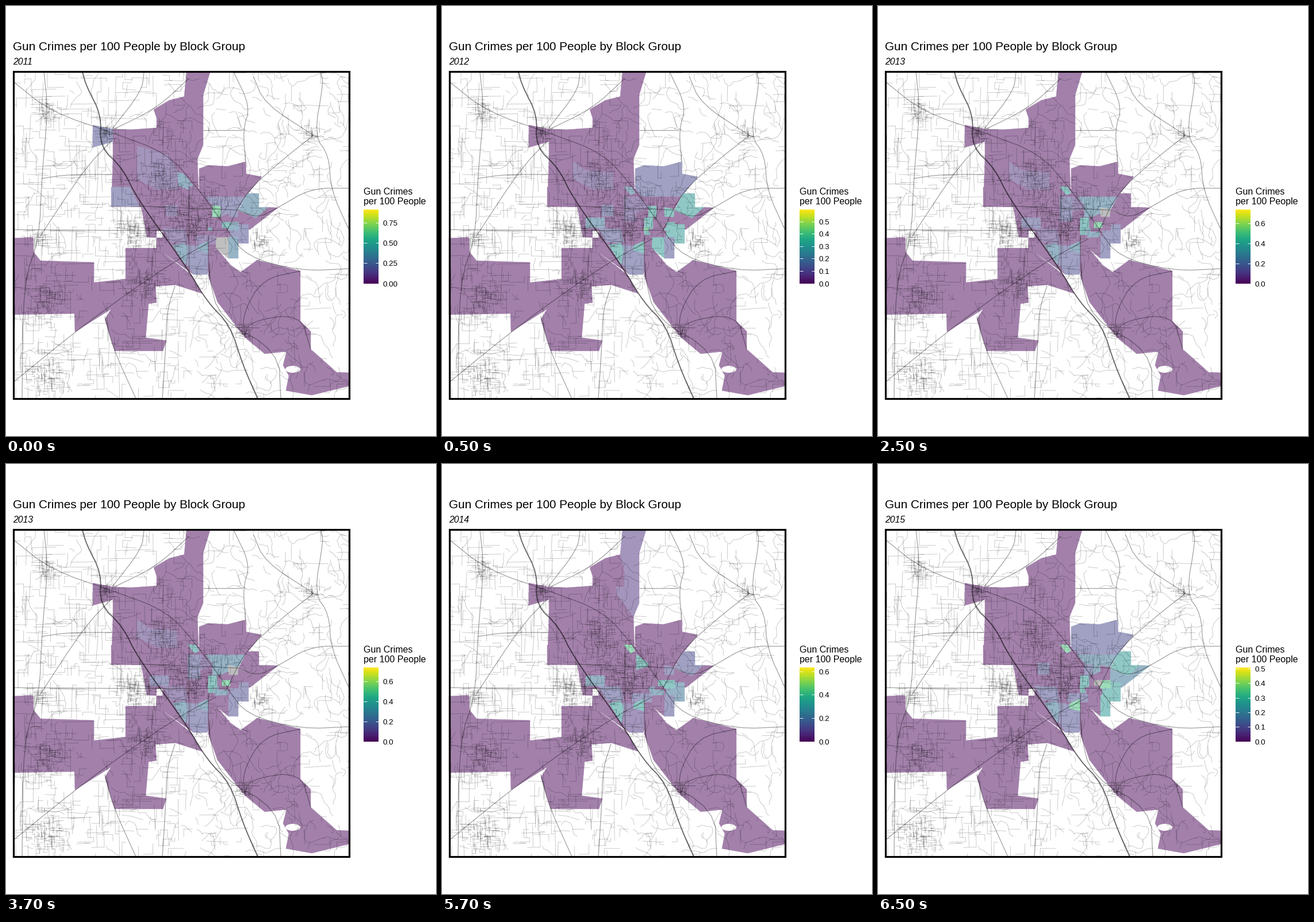
Write a matplotlib script that moves like this. It is 748x748 px and loops after 8 s.

```python
import numpy as np
import matplotlib.pyplot as plt
from matplotlib.animation import FuncAnimation
from matplotlib.collections import LineCollection
from matplotlib.patches import Ellipse, Polygon, Rectangle

SIZE, DPI = 748, 100
PT = 72 / DPI  # points per pixel
# top of the scale, tick step, decimals
SCALES = [(.911, .25, 2), (.595, .1, 1), (.739, .2, 1), (.634, .2, 1), (.508, .1, 1)]
# steps on the scale
ZERO, FEW, LOW, MID, TEAL, HIGH, TOP, NA = 0, .12, .2, .34, .5, .68, 1, None
rng = np.random.default_rng(7)
viridis = plt.get_cmap("viridis")

plt.rcParams["font.family"] = "Liberation Sans"
fig = plt.figure(figsize=(SIZE / DPI, SIZE / DPI), dpi=DPI, facecolor="white")
ax = fig.add_axes([0, 0, 1, 1])
ax.axis("off")
frame = Rectangle((13.5, 113.5), 584, 569, fill=False, ec="black", lw=3.2 * PT, zorder=5)
ax.add_patch(frame)
areas = []


def tint(t):
    base = np.array([.5, .5, .5]) if t is NA else np.array(viridis(t)[:3])
    return tuple((base + 1) / 2)


def area(levels, *xy):
    """Block group with one level per year; four numbers give a rectangle."""
    if len(xy) == 4:
        x0, y0, x1, y1 = xy
        xy = (x0, y0, x1, y0, x1, y1, x0, y1)
    patch = Polygon(np.reshape(xy, (-1, 2)), lw=.3)
    ax.add_patch(patch)
    areas.append((patch, levels))


PLAIN = (ZERO,) * 5

# outer districts
area(PLAIN, 186, 214, 218, 215, 262, 212, 262, 195, 257, 180, 284, 164, 312, 157, 333, 266,
     336, 350, 183, 349, 186, 266)
area((ZERO, ZERO, ZERO, FEW, ZERO), 314, 115, 355, 115, 343, 155, 343, 242, 333, 266, 304, 226,
     303, 213, 317, 213, 318, 185, 310, 157)
area((LOW, ZERO, ZERO, ZERO, ZERO), 151, 207, 186, 214, 186, 236, 151, 246)
area((LOW, ZERO, ZERO, ZERO, ZERO), 183, 315, 216, 315, 232, 349, 183, 349)
area(PLAIN, 12, 404, 47, 402, 48, 428, 60, 443, 153, 446, 153, 481, 208, 475, 208, 421, 262, 421,
     322, 467, 341, 500, 294, 485, 260, 488, 262, 516, 248, 518, 243, 577, 279, 582, 273, 600,
     189, 600, 172, 545, 183, 527, 120, 567, 119, 535, 12, 537)
area(PLAIN, 352, 432, 367, 422, 390, 450, 408, 463, 437, 442, 512, 461, 512, 548, 530, 566,
     530, 597, 575, 637, 597, 638, 597, 661, 532, 677, 487, 669, 492, 643, 482, 625, 488, 601,
     450, 605, 415, 576, 368, 515, 352, 470)
ax.add_patch(Ellipse((499, 632), 26, 12, fc="white"))

# city base
area(PLAIN, 235, 348, 336, 318, 404, 352, 404, 404, 367, 424, 350, 467, 326, 467, 262, 421,
     262, 403, 245, 402)
ax.add_patch(Rectangle((262, 391), 10, 12, fc="white"))

# north east
area((ZERO, LOW, ZERO, ZERO, LOW), 336, 283, 352, 277, 385, 279, 417, 271, 418, 292, 445, 297,
     416, 332, 348, 332, 336, 318)
area((MID, TEAL, ZERO, LOW, TEAL), 416, 332, 421, 326, 440, 326, 440, 350, 456, 350, 435, 369,
     405, 355)
area((ZERO, ZERO, ZERO, ZERO, MID), 456, 350, 473, 351, 424, 389, 404, 380, 404, 356, 435, 369)
area((LOW, ZERO, MID, ZERO, MID), 347, 332, 416, 332, 404, 354, 374, 366)

# north of the centre
area((FEW, FEW, FEW, ZERO, ZERO), 228, 270, 250, 285, 298, 290, 298, 319, 262, 319, 228, 301)
area((FEW, ZERO, ZERO, ZERO, ZERO), 228, 243, 281, 259, 300, 290, 250, 285, 228, 270)
area((MID, ZERO, ZERO, ZERO, ZERO), 298, 289, 309, 292, 336, 326, 300, 313)
area((ZERO, MID, TEAL, HIGH, HIGH), 316, 314, 330, 315, 336, 325, 328, 329)
area((ZERO, FEW, LOW, ZERO, ZERO), 316, 332, 338, 374)
area((FEW, LOW, ZERO, ZERO, LOW), 278, 346, 298, 366)
area((ZERO, FEW, FEW, TEAL, ZERO), 338, 331, 363, 350, 338, 358)
area((HIGH, TEAL, MID, ZERO, LOW), 359, 348, 373, 367)
area((LOW, TEAL, NA, LOW, ZERO), 387, 350, 404, 354, 403, 367, 387, 366)
area((ZERO, MID, LOW, MID, ZERO), 250, 368, 283, 386)
area((FEW, LOW, FEW, LOW, LOW), 272, 386, 311, 388, 316, 412, 286, 411)

# centre
area((ZERO, TEAL, TEAL, ZERO, TEAL), 352, 368, 367, 398)
area((MID, HIGH, TEAL, TOP, TEAL), 351, 385, 359, 391)
area((FEW, ZERO, ZERO, LOW, LOW), 330, 399, 366, 414)
area((LOW, TEAL, LOW, MID, TEAL), 390, 380, 422, 413)
area((MID, TEAL, ZERO, TEAL, HIGH), 386, 376, 405, 390)
area((TEAL, TOP, HIGH, TEAL, NA), 376, 376, 390, 386)
area((TOP, TOP, MID, MID, ZERO), 359, 390, 370, 386, 370, 393, 386, 393, 386, 403, 366, 405)
area((NA, TEAL, TOP, TOP, TOP), 366, 403, 387, 402, 387, 439, 365, 421)
area((MID, LOW, LOW, LOW, TEAL), 387, 402, 404, 439)

# south of the centre
area((LOW, LOW, LOW, FEW, LOW), 312, 415, 352, 420, 350, 467, 326, 467, 306, 436)
area((MID, TEAL, MID, TEAL, MID), 290, 416, 310, 412, 316, 421, 312, 450)
area((MID, TEAL, MID, TEAL, HIGH), 333, 417, 351, 409, 352, 430, 333, 425)
area((ZERO, ZERO, ZERO, TOP, ZERO), 272, 411, 284, 408, 291, 418, 274, 432, 268, 423)


def smooth(points):
    points = np.reshape(points, (-1, 2)).astype(float)
    for _ in range(2):
        a, b = points[:-1], points[1:]
        cut = np.stack([.75 * a + .25 * b, .25 * a + .75 * b], 1).reshape(-1, 2)
        points = np.vstack([points[:1], cut, points[-1:]])
    return points


def roads(lines, width, alpha):
    group = LineCollection(lines, colors=[(0, 0, 0, alpha)], linewidths=width * PT, zorder=3)
    ax.add_collection(group)
    group.set_clip_path(frame)


def lane(x, y, steps, stride, bend=0):
    """Walk with right-angle turns, or a wandering path when bend is set."""
    heading = rng.integers(4) * np.pi / 2 + rng.normal(0, .03)
    path = [(x, y)]
    for _ in range(steps):
        if bend:
            heading += rng.normal(0, bend)
        elif rng.random() < .35:
            heading += rng.choice([-1, 1]) * np.pi / 2
        d = stride * rng.uniform(.4, 1.4)
        x, y = x + d * np.cos(heading), y + d * np.sin(heading)
        path.append((x, y))
    return path


def spread(n, left, right, steps, stride, bend=0):
    return [lane(rng.uniform(left, right), rng.uniform(113, 683),
                 rng.integers(2, steps), stride, bend) for _ in range(n)]


def town(x, y, size):
    return [lane(rng.normal(x, size), rng.normal(y, size * .9), rng.integers(1, 4), 7)
            for _ in range(int(25 + .3 * size ** 2))]


minor = spread(400, 12, 310, 6, 13) + spread(150, 12, 345, 10, 7, .45)
minor += spread(250, 335, 598, 15, 6, .5) + spread(80, 345, 598, 5, 11)
for place in [(322, 365, 34), (275, 298, 16), (242, 485, 17), (228, 395, 19), (178, 222, 9),
              (72, 183, 10), (70, 642, 19), (58, 405, 8), (72, 505, 20), (442, 408, 8),
              (415, 568, 8), (530, 225, 7)]:
    minor += town(*place)
roads(minor, .75, .27)


def road(*xy, width=1.25, alpha=.37):
    roads([smooth(xy)], width, alpha)


road(12, 131, 78, 184, 190, 222, 280, 256, 330, 312, 385, 388)
road(318, 126, 262, 178, 188, 214)
road(240, 115, 236, 148, 186, 212)
road(66, 115, 73, 180, 62, 300, 58, 405, 30, 480, 28, 683)
road(184, 234, 136, 284, 60, 400)
road(12, 655, 120, 567, 215, 497, 300, 440, 366, 405)
road(535, 225, 480, 268, 416, 325, 385, 390)
road(548, 115, 552, 135, 536, 225, 562, 260, 565, 320, 597, 390)
road(404, 355, 437, 369, 473, 351, 530, 317, 597, 317)
road(385, 390, 418, 436, 512, 461, 597, 457)
road(12, 389, 262, 391, 385, 390)
road(62, 300, 110, 293, 184, 293)
road(294, 487, 280, 530, 278, 590, 272, 683)
road(352, 398, 352, 470, 372, 545, 474, 600, 478, 683)
road(512, 461, 446, 475, 412, 535, 415, 573)
road(415, 573, 425, 548, 512, 535, 530, 597)
road(172, 540, 186, 595, 226, 683)
road(396, 115, 425, 175, 412, 215, 417, 271)
road(430, 122, 450, 170, 535, 225)
road(232, 348, 404, 355)
road(318, 314, 318, 466)
road(343, 216, 412, 216)
road(133, 115, 140, 140, 166, 190, 163, 245, 203, 282, 228, 335, 313, 452, 350, 515, 390, 555,
     412, 625, 438, 683, width=1.9, alpha=.58)


def label(x, y, text, px, **kw):
    return ax.text(x, y, text, fontsize=px * PT, color="black", va="baseline", **kw)


label(12, 77, "Gun Crimes per 100 People by Block Group", 20.8)
year_text = label(12, 102, "", 15.8, style="italic")
label(622.5, 327.5, "Gun Crimes", 16.05)
label(622.5, 345, "per 100 People", 16.05)

LEFT, RIGHT, UPPER, LOWER, TICK = 622.5, 648.5, 354, 482.5, 5.2
ax.imshow(np.linspace(1, 0, 300)[:, None], cmap=viridis, aspect="auto", zorder=2,
          extent=(LEFT, RIGHT, LOWER, UPPER))
tick_marks = LineCollection([], colors="white", linewidths=.9 * PT, zorder=4)
ax.add_collection(tick_marks)
tick_labels = [label(656, 0, "", 13.4) for _ in range(6)]
ax.set_xlim(0, SIZE)
ax.set_ylim(SIZE, 0)


def draw(i):
    k = (i + 3) // 4  # the first year holds for one step, later ones for up to four
    year_text.set_text(str(2011 + k))
    for patch, levels in areas:
        patch.set_color(tint(levels[k]))
    top, step, digits = SCALES[k]
    marks = []
    for n, text in enumerate(tick_labels):
        value = n * step
        text.set_visible(value <= top)
        if value <= top:
            y = LOWER - value / top * (LOWER - UPPER)
            text.set_text(f"{value:.{digits}f}")
            text.set_y(y + 5)
            marks += [[(LEFT, y), (LEFT + TICK, y)], [(RIGHT - TICK, y), (RIGHT, y)]]
    tick_marks.set_segments(marks)
    return []


anim = FuncAnimation(fig, draw, frames=16, interval=500, repeat=True, repeat_delay=0, blit=False)
plt.show()
```
